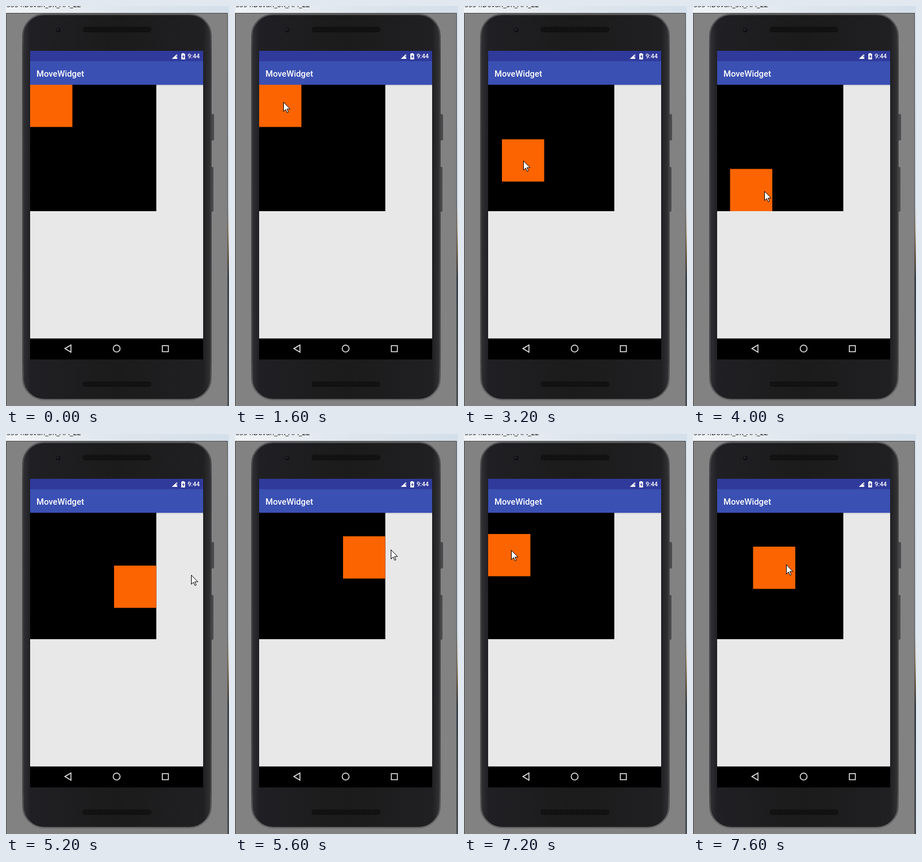
An HTML page for the animation above (8 s loop, 388 by 696 pixels).

```html
<!DOCTYPE html>
<html lang="en">
<head>
<meta charset="utf-8">
<title>MoveWidget</title>
<style>
html, body { margin: 0; width: 100%; height: 100%; overflow: hidden; background: #828282; }
svg { display: block; width: 388px; height: 696px; }
.ui { font-family: Roboto, sans-serif; font-weight: 500; fill: #fff; }
.caption { font: 12px "Open Sans", sans-serif; fill: #111; }
.nav { fill: none; stroke: #eee; stroke-width: 1.5; }
</style>
</head>
<body>
<svg viewBox="0 0 388 696">
  <defs>
    <linearGradient id="body" x2="1" y2="0">
      <stop offset="0" stop-color="#303035"/>
      <stop offset=".04" stop-color="#202024"/>
      <stop offset=".5" stop-color="#1b1b1b"/>
      <stop offset=".96" stop-color="#202023"/>
      <stop offset="1" stop-color="#333336"/>
    </linearGradient>
    <linearGradient id="rim" x2="0" y2="1">
      <stop offset="0" stop-color="#59595c"/>
      <stop offset=".1" stop-color="#3a3a3c"/>
      <stop offset=".9" stop-color="#444"/>
      <stop offset="1" stop-color="#686868"/>
    </linearGradient>
    <linearGradient id="sky" x2="1" y2="0">
      <stop offset="0" stop-color="#f0f3f6"/>
      <stop offset=".5" stop-color="#dfe6ec"/>
      <stop offset="1" stop-color="#d3dfea"/>
    </linearGradient>
    <linearGradient id="desk" x2="0" y2="1">
      <stop offset="0" stop-color="#d3dfea"/>
      <stop offset=".5" stop-color="#c5d0da"/>
      <stop offset=".56" stop-color="#c0b4a0"/>
      <stop offset=".63" stop-color="#75624d"/>
      <stop offset=".68" stop-color="#37414b"/>
      <stop offset="1" stop-color="#4b5057"/>
    </linearGradient>
    <pattern id="mesh" width="4" height="4" patternUnits="userSpaceOnUse">
      <rect width="4" height="4" fill="#101010"/>
      <circle cx="2" cy="2" r="1" fill="#191919"/>
    </pattern>
  </defs>

  <!-- window -->
  <rect width="388" height="696" fill="#828282"/>
  <rect x="386" width="2" height="696" fill="url(#desk)"/>
  <rect width="388" height="12" fill="url(#sky)"/>
  <text class="caption" x="1" y="2">5554:Dovun_5K_API_22</text>
  <path d="M.5 696V12.5H385.5V696" fill="none" stroke="#4a4a4a"/>

  <!-- phone -->
  <path d="M357 188h3q2 0 2 2v42q0 2-2 2h-3zM357 280h2q2 0 2 2v74q0 2-2 2h-2z" fill="#4a4a4c"/>
  <rect x="29.5" y="14.5" width="327" height="670.5" rx="37" fill="url(#body)" stroke="url(#rim)" stroke-width="2.5"/>
  <circle cx="91" cy="42" r="4" fill="#121216"/>
  <circle cx="90" cy="41" r="1.3" fill="#303039"/>
  <rect x="133" y="36" width="120" height="10" rx="5" fill="url(#mesh)"/>
  <rect x="133" y="653" width="120" height="10" rx="5" fill="url(#mesh)"/>

  <!-- screen -->
  <rect x="42" y="78" width="301" height="537" fill="#e8e8e8"/>
  <rect x="42" y="137" width="301" height="1" fill="#b9bdcd"/>
  <rect x="42" y="138" width="301" height="1" fill="#d9dae0"/>
  <rect x="42" y="78" width="301" height="18" fill="#303a9b"/>
  <rect x="42" y="96" width="301" height="41" fill="#3a50b3"/>
  <path d="M298 83V92H288.5Z" fill="#fff"/>
  <path d="M296 83h2v6h-2z" fill="#303a9b"/>
  <path d="M296.5 84h1.3v4h-1.3z" fill="#fff"/>
  <path d="M306.500 82h3v1h2v10h-6.500v-10h1.500z" fill="#fff"/>
  <path d="M309 84.500l-2.500 4h1.500v3l2.500-4h-1.500z" fill="#303a9b"/>
  <text class="ui" x="316" y="91" font-size="10.7">9:44</text>
  <text class="ui" x="53" y="122.500" font-size="14.8">MoveWidget</text>

  <rect x="42" y="137" width="219.500" height="220" fill="#000"/>
  <rect id="box" width="73.500" height="73.500" fill="#fb6400"/>

  <rect x="42" y="578.500" width="301" height="36.500" fill="#000"/>
  <g class="nav">
    <path d="M102.500 596 113 589.800V602.500Z"/>
    <circle cx="192.500" cy="596" r="6"/>
    <rect x="272" y="591" width="10.500" height="10.500"/>
  </g>

  <path id="pointer" d="M.5 .5V16.500L4.200 13 6.800 18.700 9 17.700 6.500 12.200H11.800Z" fill="#fff" stroke="#000" stroke-linejoin="round"/>
</svg>
<script>
const LOOP = 8000, STEP = 400;
const box = document.getElementById("box");
const pointer = document.getElementById("pointer");

// Box x, y and pointer x, y per step; the pointer enters at the third.
const poses = [
  [42, 137], [42, 137],
  [42, 137, 119, 165], [42, 137, 91, 167], [42, 137, 84, 167],
  [60, 141, 101, 173], [82, 160, 122, 192], [87, 190, 126, 224],
  [66, 232, 103, 269], [59, 243, 99, 280], [64.5, 283.5, 124, 322],
  [168, 260, 229, 296], [188, 242, 290, 272], [188, 229, 322, 245],
  [188, 178, 271, 201], [148, 140, 190, 163], [93, 137, 118, 151],
  [42, 154, 59, 173], [42, 174, 82, 202], [104.5, 196, 162, 227]
];

function place(el, x, y) {
  el.setAttribute("transform", `translate(${x} ${y})`);
}

function draw(now) {
  const [x, y, px = -50, py = -50] = poses[Math.floor(now % LOOP / STEP)];
  place(box, x, y);
  place(pointer, px, py);
  requestAnimationFrame(() => draw(performance.now()));
}
draw(performance.now());
</script>
</body>
</html>
```
